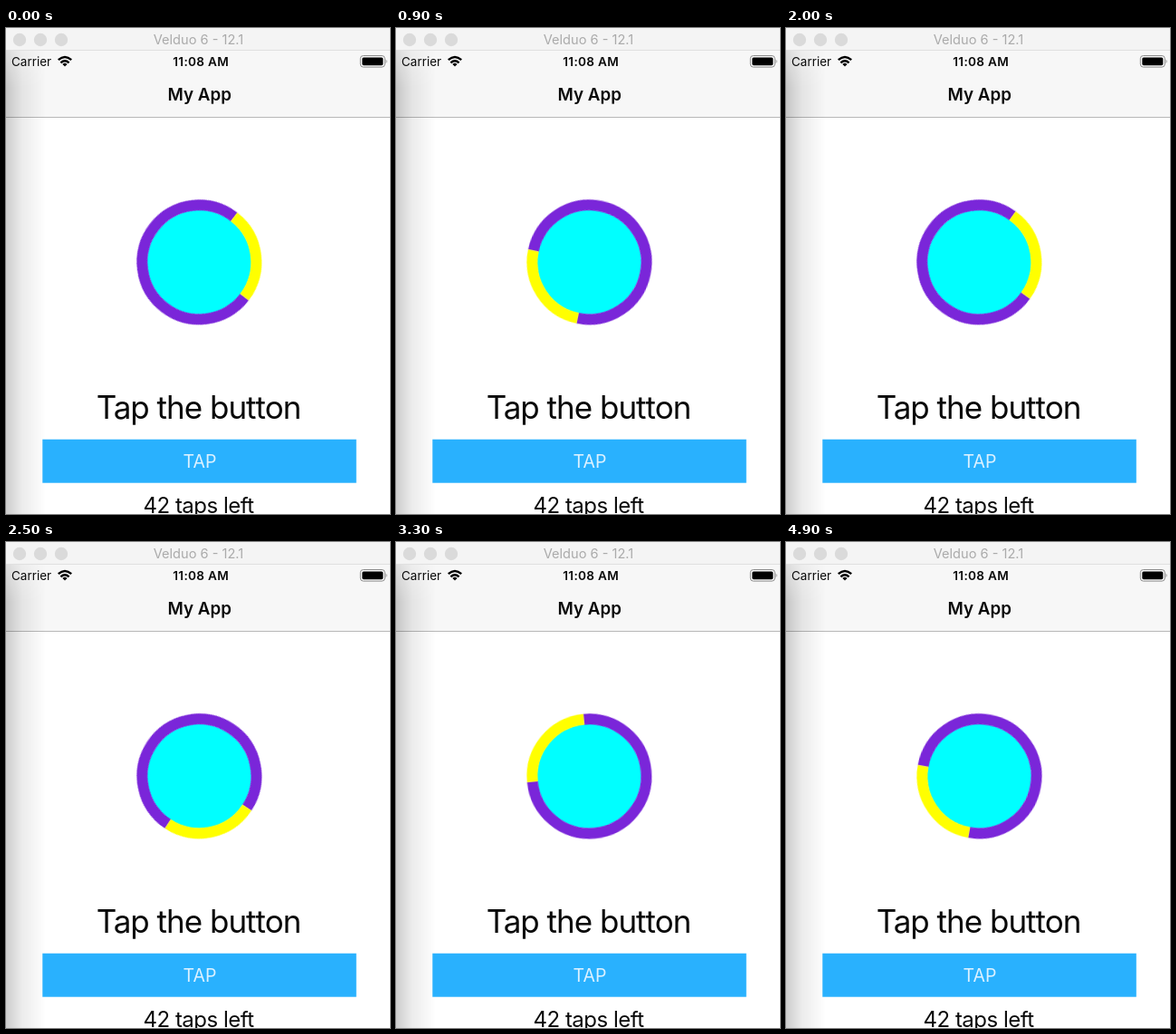
Animation of 424x536 px, one loop 5 s. Source, as an HTML page:

```html
<!DOCTYPE html>
<html lang="en">
<head>
<meta charset="utf-8">
<title>Tap the button</title>
<style>
  html, body { margin: 0; width: 100%; height: 100%; overflow: hidden; background: #fff; }
  svg { display: block; width: 424px; height: 536px; }
  text { font-family: Inter, Roboto, sans-serif; font-optical-sizing: none; fill: #0a0a0a; }
  .mid { text-anchor: middle; }
  .title { font-size: 14.6px; fill: #aaa; }
  .carrier { font-size: 13.5px; }
  .clock { font-size: 13.6px; font-weight: 600; letter-spacing: .3px; }
  .nav { font-size: 18.8px; font-weight: 600; }
  .head { font-size: 35px; letter-spacing: -1px; }
  .label { font-size: 19.5px; fill: #dcf1ff; }
  .count { font-size: 24px; letter-spacing: -.5px; }

  .ring {
    fill: none;
    stroke-width: 12;
    transform-origin: 213.4px 258.3px;
    animation: spin 5s infinite;
  }
  /* ten pictures a second, about half a turn per second */
  @keyframes spin {
    0%   { transform: rotate(-52.4deg); animation-timing-function: steps(9); }
    18%  { transform: rotate(101.8deg); animation-timing-function: steps(11); }
    40%  { transform: rotate(305.7deg); animation-timing-function: steps(9); }
    58%  { transform: rotate(463.5deg); animation-timing-function: steps(4); }
    66%  { transform: rotate(534.5deg); animation-timing-function: steps(8); }
    82%  { transform: rotate(679.2deg); animation-timing-function: steps(8); }
    98%, 100% { transform: rotate(820.3deg); }
  }
</style>
</head>
<body>
<svg viewBox="0 0 424 536">
  <defs>
    <linearGradient id="side">
      <stop offset="0" stop-color="#000" stop-opacity=".2"/>
      <stop offset=".4" stop-color="#000" stop-opacity=".075"/>
      <stop offset="1" stop-color="#000" stop-opacity="0"/>
    </linearGradient>
    <linearGradient id="fade" x2="0" y2="1">
      <stop offset="0" stop-color="#888"/>
      <stop offset=".08" stop-color="#fff"/>
    </linearGradient>
    <mask id="soft"><rect y="25" width="424" height="511" fill="url(#fade)"/></mask>
  </defs>

  <rect width="424" height="536" fill="#fff"/>
  <rect width="424" height="98" fill="#f7f7f7"/>
  <rect width="424" height="25" fill="#f4f4f4"/>
  <rect y="24" width="424" height="1" fill="#e0e0e0"/>
  <rect y="98" width="424" height="1" fill="#b8b8b8"/>
  <rect y="25" width="44" height="511" fill="url(#side)" mask="url(#soft)"/>

  <g fill="#dadada">
    <circle cx="15" cy="13" r="7.2"/>
    <circle cx="38" cy="13" r="7.2"/>
    <circle cx="61" cy="13" r="7.2"/>
  </g>
  <text class="mid title" x="212.5" y="18">Velduo 6 - 12.1</text>

  <text class="carrier" x="6" y="42">Carrier</text>
  <g fill="none" stroke="#000" stroke-width="2.4">
    <path d="M57.8 35.2Q65 28.8 72.2 35.2"/>
    <path d="M60.4 38.3Q65 34.2 69.6 38.3"/>
    <path d="M62.4 39.9Q65 37.8 67.6 39.9L65 42.6Z" fill="#000" stroke="none"/>
  </g>
  <text class="mid clock" x="215.2" y="42">11:08 AM</text>
  <rect x="391.3" y="30.5" width="27" height="12.6" rx="3.2" fill="none" stroke="#8c8c8c"/>
  <rect x="393.3" y="32.4" width="23" height="8.8" rx="1.6" fill="#000"/>
  <path d="M419.6 34.5Q421.6 36.8 419.6 39.2Z" fill="#8c8c8c"/>
  <text class="mid nav" x="213.7" y="80">My App</text>

  <circle cx="213.4" cy="258.3" r="57.5" fill="#0ff"/>
  <g class="ring">
    <circle cx="213.4" cy="258.3" r="63" stroke="#7a26d9" pathLength="360" stroke-dasharray="0 90 270"/>
    <circle cx="213.4" cy="258.3" r="63" stroke="#ff0" pathLength="360" stroke-dasharray="90 270"/>
  </g>

  <text class="mid head" x="212.5" y="431">Tap the button</text>
  <rect x="40.3" y="453.7" width="346.5" height="48" fill="#29b1fe"/>
  <text class="mid label" x="214" y="485">TAP</text>
  <text class="mid count" x="212.6" y="534.5">42 taps left</text>
</svg>
</body>
</html>
```
